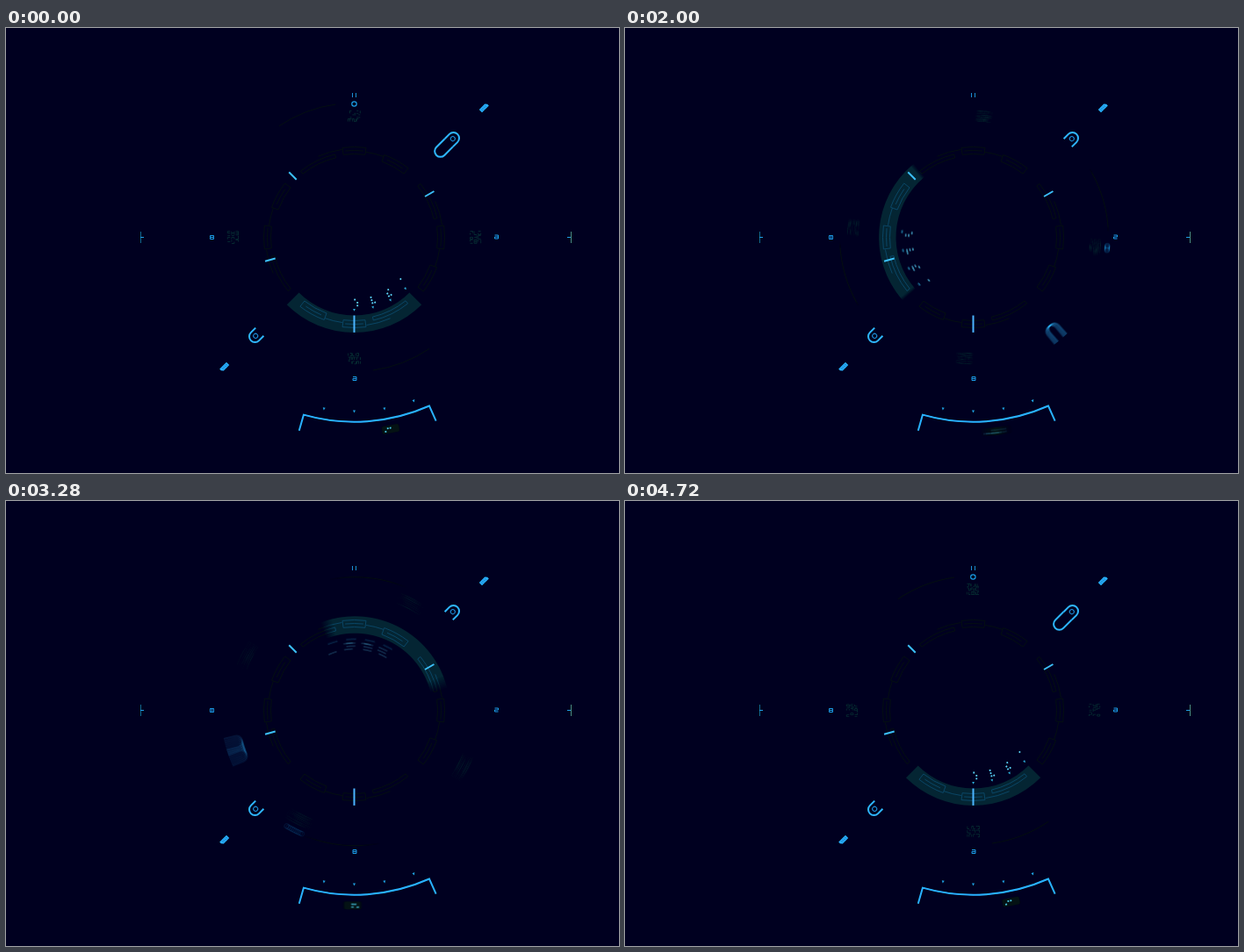
Recreate the animation shown at these times as an HTML page with a canvas. Size 698x507 px, loop 4760 ms.

```html
<!DOCTYPE html>
<html lang="en">
<head>
<meta charset="utf-8">
<title>Radar dial</title>
<style>
html, body { margin: 0; width: 100%; height: 100%; overflow: hidden; background: #000020; }
canvas { display: block; width: 698px; height: 507px; }
</style>
</head>
<body>
<canvas id="stage" width="698" height="507"></canvas>
<script>
const W = 698, H = 507, CX = 396.5, CY = 238.5, PIVOT = .5;
const STEP = 1190, LOOP = STEP * 4, TICK = 40, SHUTTER = 20;
const RAD = Math.PI / 180;
const BG = '#000020', BLUE = '#29b2ff', DARK = '#040f12';

// Lit cells as bits: 2-wide grids by the sweep, 5-wide grids on the slider
const CLUSTERS = [41, 53, 54, 2];
const MARKS = [38, 360, 512, 652];

const main = document.getElementById('stage').getContext('2d');
const buffer = document.createElement('canvas');
buffer.width = W;
buffer.height = H;
const layer = buffer.getContext('2d');

const mod = (a, b) => (a % b + b) % b;
const clamp = v => Math.max(0, Math.min(1, v));
const ease = p => p < .5 ? 4 * p ** 3 : 1 - 4 * (1 - p) ** 3;
const easeBack = p => 1 + 3.5 * (p - 1) ** 3 + 2.5 * (p - 1) ** 2;
const noise = n => mod(Math.sin(n * 12.9898 + 4.1) * 43758.5453, 1);
const stop = k => 70 + 10 * mod(1 - k, 4);

function turn(t) {
  return 90 * (Math.floor(t / STEP) + ease(clamp((mod(t, STEP) - 700) / 475)));
}

// Steps back by 10 degrees, wraps at the end, always overshoots backwards
function slideAngle(t) {
  const k = Math.floor((t - 760) / STEP);
  const f = easeBack(clamp((t - 760 - k * STEP) / 540)), c = clamp(f);
  return stop(k) + (stop(k + 1) - stop(k)) * c - 10 * (f - c);
}

// Runs draw with the origin at a polar point and +x pointing outward
function polar(g, deg, r, draw) {
  g.save();
  g.translate(CX, CY);
  g.rotate(deg * RAD);
  g.translate(r, 0);
  draw();
  g.restore();
}

function stroke(g, color, width = 1) {
  g.strokeStyle = color;
  g.lineWidth = width;
  g.stroke();
}

function line(g, x0, y0, x1, y1, color, width) {
  g.beginPath();
  g.moveTo(x0, y0);
  g.lineTo(x1, y1);
  stroke(g, color, width);
}

function arc(g, r, a, b, color) {
  g.beginPath();
  g.arc(CX, CY, r, a * RAD, b * RAD);
  stroke(g, color);
}

function circle(g, r, color, width) {
  g.beginPath();
  g.arc(0, 0, r, 0, 7);
  stroke(g, color, width);
}

function pointer(g, size, color) {
  g.beginPath();
  g.moveTo(-size, -size);
  g.lineTo(size, 0);
  g.lineTo(-size, size);
  g.fillStyle = color;
  g.fill();
}

function sector(g, a, b, r0, r1) {
  g.beginPath();
  g.arc(CX, CY, r1, a * RAD, b * RAD);
  g.arc(CX, CY, r0, b * RAD, a * RAD, true);
  g.closePath();
}

// Calls place(column, row) for each set bit
function eachBit(bits, cols, place) {
  for (let i = 0; bits >> i; i++) {
    if (bits >> i & 1) place(i % cols, Math.floor(i / cols));
  }
}

function dot(g, x, y, color) {
  g.fillStyle = color;
  g.fillRect(x - .9, y - .9, 1.8, 1.8);
}

// Each quarter has a centre box, a wide box after it and a slim one before
function ring(g, color) {
  const box = (mid, half, r0, r1) => {
    sector(g, mid - half, mid + half, r0, r1);
    stroke(g, color);
  };
  for (let q = 0; q < 360; q += 90) {
    box(q, 7.5, 95, 103);
    arc(g, 99, q - 6, q + 6, color);
    box(q + 29, 9, 92, 100);
    arc(g, 96, q + 23, q + 35, color);
    box(q - 26, 13, 93, 97);
    arc(g, 101, q - 24, q - 8, color);
    arc(g, 98, q + 8, q + 20, color);
  }
}

// U bracket: half circle toward dir, legs the other way
function bracket(g, dir, leg) {
  g.beginPath();
  g.moveTo(-dir * leg, -6.5);
  g.arc(0, 0, 6.5, -Math.PI / 2, Math.PI / 2, dir < 0);
  g.lineTo(-dir * leg, 6.5);
  stroke(g, '#2fb8ff', 2);
}

// Adds a seven-segment figure: three bars, then four uprights
function segments(g, x, y, w, h, bits) {
  for (let i = 0; i < 7; i++) {
    if (!(bits >> i & 1)) continue;
    const bar = i < 3, k = i - 3;
    const sx = bar ? x : x + k % 2 * w;
    const sy = y + h * (bar ? i : k >> 1);
    g.moveTo(sx, sy);
    g.lineTo(bar ? sx + w : sx, bar ? sy : sy + h);
  }
}

function digits(g, seed) {
  g.beginPath();
  for (let d = 0; d < 9; d++) {
    segments(g, d % 3 * 4.6 - 6, Math.floor(d / 3) * 4.9 - 7, 3, 2, Math.floor(noise(seed * 9 + d) * 128));
  }
  stroke(g, '#0a3a38', .7);
}

function glyph(g, x, y, bits, deg = 0) {
  g.save();
  g.translate(x, y);
  g.rotate(deg * RAD);
  g.beginPath();
  segments(g, -2, -2, 4, 2, bits);
  stroke(g, '#1c9ce8');
  g.restore();
}

function drawMoving(g, t, tick) {
  const rot = turn(t);
  g.fillStyle = BG;
  g.fillRect(0, 0, W, H);
  ring(g, DARK);

  // The turning group pivots slightly off the dial centre
  const spin = () => {
    g.translate(CX + PIVOT, CY + PIVOT);
    g.rotate(rot * RAD);
    g.translate(-CX - PIVOT, -CY - PIVOT);
  };

  g.save();
  spin();
  sector(g, 45, 135, 89, 108.5);
  g.fillStyle = '#042533';
  g.fill();
  g.clip();
  g.setTransform(1, 0, 0, 1, 0, 0);
  ring(g, '#0a4666');
  g.restore();

  g.save();
  spin();
  arc(g, 153, -124, -98, DARK);
  arc(g, 153, 56, 82, DARK);
  CLUSTERS.forEach((bits, i) => polar(g, 90 - 15 * i, 0, () => {
    eachBit(bits, 2, (c, r) => dot(g, 71 + r * 3.4, -.7 - c * 3, '#5fdcff'));
    g.translate(82.8, 0);
    pointer(g, 1.4, '#2fb0dc');
  }));
  for (let i = 0; i < 4; i++) {
    polar(g, i * 90, 138, () => digits(g, tick * 4 + i));
  }
  polar(g, -90, 152, () => circle(g, 2.7, '#1c9fe6', 1.2));
  polar(g, -45, 138.8, () => bracket(g, -1, 13.5));
  g.restore();

  polar(g, slideAngle(t), 222.3, () => {
    g.rotate(-Math.PI / 2);
    g.fillStyle = '#041214';
    g.beginPath();
    g.roundRect(-10, -4.5, 20, 9, 2);
    g.fill();
    const mark = MARKS[mod(Math.floor((t + 330) / STEP), 4)];
    eachBit(mark, 5, (c, r) => dot(g, c * 3 - 6, r * 3.2 - 1.3, '#4fd4f4'));
  });
}

function drawFixed(g, t, tick) {
  const u = mod(t, STEP);

  for (const deg of [225, -30, 165]) {
    polar(g, deg, 99, () => line(g, -6, 0, 6, 0, '#3cc0fa', 2));
  }
  polar(g, 90, 98.7, () => line(g, -9.7, 0, 9.7, 0, '#4bb4ff', 2));

  for (const deg of [-45, 135]) {
    polar(g, deg, 159.8, () => bracket(g, 1, 7.5));
    polar(g, deg, 158.8, () => circle(g, 2.5, '#1d94dc'));
    polar(g, deg, 209, () => {
      g.fillStyle = BLUE;
      g.beginPath();
      g.moveTo(-5.5, -2.3);
      g.lineTo(3.5, -2.3);
      g.lineTo(5.5, 0);
      g.lineTo(5.5, 2.3);
      g.lineTo(-5.5, 2.3);
      g.fill();
      for (let x = -4; x < 4; x += 2) line(g, x, -1.3, x + 1, 1.3, '#0a5f9c', .5);
    });
  }

  // Lower scale
  arc(g, 210.2, 66, 105.9, BLUE);
  g.beginPath();
  g.arc(CX, CY, 229, 105.9 * RAD, 105.9 * RAD);
  g.arc(CX, CY, 210.2, 105.9 * RAD, 66 * RAD, true);
  g.arc(CX, CY, 229, 66 * RAD, 66 * RAD);
  stroke(g, BLUE, 2);
  for (let deg = 70; deg <= 100; deg += 10) {
    polar(g, deg, 198.5, () => pointer(g, 1.5, '#1fa4e4'));
  }

  // Side figures switch during each step
  const early = u < 135 || u > 1025;
  glyph(g, 234.5, 238.5, 127, u < 280 || u > 1025 ? 0 : 90);
  glyph(g, 558.5, 238, early ? 119 : 55);
  glyph(g, 397, 399.5, early ? 119 : 127);
  for (const x of [394.5, 398.5]) line(g, x, 74, x, 79, '#1c8ed2');

  // Outer markers flash on alternate ticks
  if (tick % 2 === 0) {
    line(g, 153.5, 232, 153.5, 245, '#12688c');
    line(g, 153, 238.5, 157, 238.5, '#1f9ce4');
    line(g, 643.5, 232, 643.5, 245, '#4a8c80');
    line(g, 639, 238.5, 643, 238.5, '#1f9ce4');
  }
}

function render(t) {
  const tick = Math.floor(t / TICK);
  const sweep = f => Math.abs(f(t + SHUTTER / 2) - f(t - SHUTTER / 2));
  const n = sweep(turn) > .6 || sweep(slideAngle) > .2 ? 10 : 1;
  // Running average of shutter samples gives motion blur
  for (let i = 0; i < n; i++) {
    drawMoving(layer, t + ((i + .5) / n - .5) * SHUTTER, tick);
    main.globalAlpha = 1 / (i + 1);
    main.drawImage(buffer, 0, 0);
  }
  main.globalAlpha = 1;
  drawFixed(main, t, tick);
}

const start = performance.now();
function loop() {
  const t = (performance.now() - start) % LOOP;
  render(Math.floor(t / TICK) * TICK);
  requestAnimationFrame(loop);
}
loop();
</script>
</body>
</html>
```
